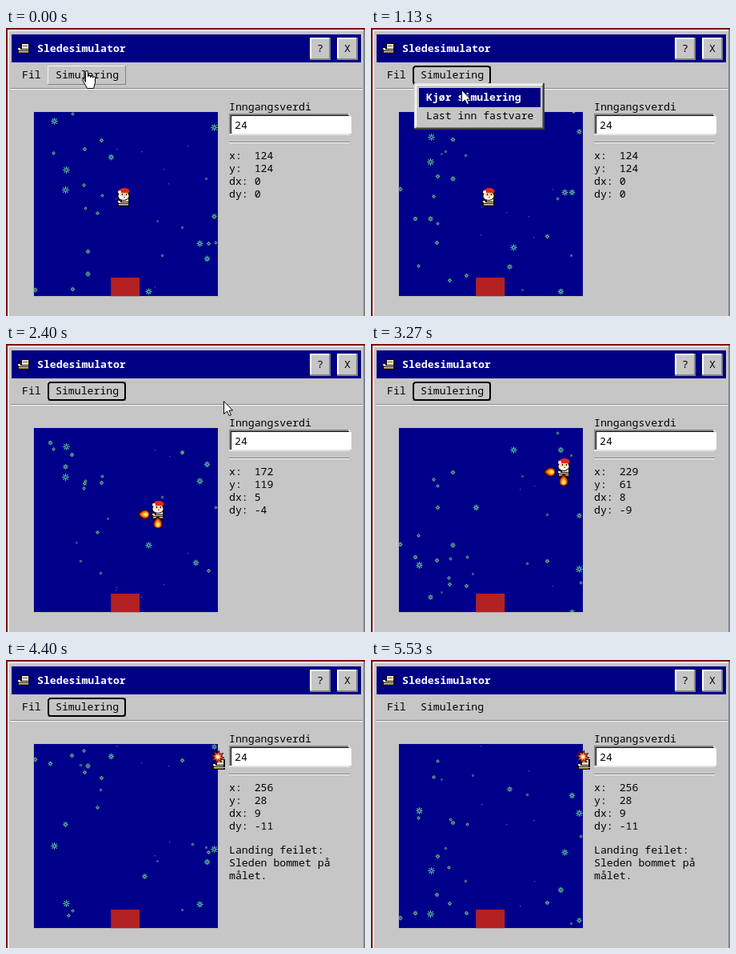
An HTML page with a canvas for the animation above (5.59 s loop, 449 by 360 pixels).

```html
<!DOCTYPE html>
<html lang="no">
<head>
<meta charset="utf-8">
<title>Sledesimulator</title>
<style>
html, body { margin: 0; width: 449px; height: 360px; overflow: hidden; background: #c6c6c6; }
canvas { position: absolute; left: 0; top: 0; }
.t { position: absolute; font: 13.2px/16px "Noto Sans Mono", "DejaVu Sans Mono", monospace; color: #000; white-space: pre; }
.w { color: #fff; font-weight: 700; }
</style>
</head>
<body>
<canvas id="scene" width="449" height="360"></canvas>
<div id="text"></div>
<canvas id="pointer" width="449" height="360"></canvas>
<script>
const W = 449, H = 360, LOOP = 5590, FPS = 15, STEPS = 84;
const g = document.getElementById('scene').getContext('2d');
const p = document.getElementById('pointer').getContext('2d');
const sky = { x: 34.7, y: 105, size: 230.3 };
const GREY = '#c6c6c6', SHADE = '#848484', LIGHT = '#e4e4e4', NAVY = '#000084';
const CREAM = '#eadfce', INK = '#111';

function label(x, y, str, cls = '') {
  const el = document.createElement('div');
  el.className = 't ' + cls;
  el.style.left = x + 'px';
  el.style.top = y + 'px';
  el.textContent = str;
  document.getElementById('text').append(el);
  return el;
}

label(39, 17, 'Sledesimulator', 'w');
label(389, 17, '?');
label(423, 17, 'X');
label(20, 50, 'Fil');
label(62, 50, 'Simulering');
label(279, 90, 'Inngangsverdi');
label(286, 113, '24');
const stats = label(279, 151, '');
const verdict = label(279, 229, 'Landing feilet:\nSleden bommet på\nmålet.');
const runItem = label(69, 78, 'Kjør simulering');
const loadItem = label(69, 101, 'Last inn fastvare');

function rect(c, x, y, w, h) {
  g.fillStyle = c;
  g.fillRect(x, y, w, h);
}

// Bevel: top and left in one colour, bottom and right in the other.
function bevel(x, y, w, h, a, b, n = 1) {
  rect(b, x, y, w, h);
  rect(a, x, y, w - n, h - n);
  rect(GREY, x + n, y + n, w - 2 * n, h - 2 * n);
}

function rule(x, y, w) {
  rect(SHADE, x, y, w, 1);
  rect('#fff', x, y + 1, w, 1);
}

function frameWindow() {
  rect('#800000', 0, 0, W, H);
  bevel(2, 2, W - 2, H + 8, '#fff', SHADE, 2);
  rect(NAVY, 7, 8, 437, 35);
  sled(14, 19);
  for (const x of [380, 414]) bevel(x, 12, 26, 28, '#fff', SHADE, 2);
  rule(6, 75, 440);
  bevel(279, 107, 151, 27, SHADE, LIGHT, 2);
  rect(INK, 281, 109, 148, 1);
  rect(INK, 281, 109, 1, 23);
  rect('#fff', 282, 110, 150, 22);
  rule(279, 142, 151);
}

function menuButton(active) {
  bevel(52, 47, 98, 24, '#f2f2f2', SHADE);
  if (!active) return;
  g.strokeStyle = '#000';
  g.lineWidth = 2;
  g.beginPath();
  g.roundRect(53, 48, 96, 22, 3);
  g.stroke();
}

function menu(lit) {
  bevel(54, 69, 163, 58, LIGHT, '#404040', 2);
  bevel(56, 71, 159, 54, '#fff', SHADE);
  if (lit) rect(NAVY, 60, 75, 152, 24);
}

// --- Snow: nearer flakes fall faster and are larger.
const PERIOD = 324, SNOW_TOP = 62;
let seed = 24;
function random(a, b) {
  seed = (seed * 16807) % 2147483647;
  return a + (b - a) * seed / 2147483647;
}

const near = [
  [74, 202, 17], [75, 177, 16.65], [60, 116, 16.48], [260, 124, 16.42],
  [178, 329, 15.82], [242, 269, 15.27], [251, 288, 14.18], [131, 161, 14.1],
  [237, 89, 14.1], [260, 235, 12.8], [173, 83, 12.65], [74, 25, 12.55],
  [102, 307, 12.08], [36, 327, 11.65], [102, 279, 10.8]
];
const flakes = near.map(([x, y, v]) => ({ x, y, v }));
for (let i = 0; i < 32; i++)
  flakes.push({ x: random(55, 265), y: random(0, PERIOD), v: 11 - 0.27 * i });

function drawFlake({ x, y, v }, k) {
  const cx = Math.round(x) + 0.5;
  const cy = Math.round(SNOW_TOP + (y + v * k - SNOW_TOP + PERIOD) % PERIOD) + 0.5;
  const r = 0.26 * v;
  g.globalAlpha = Math.min(1, 0.45 + v / 22);
  if (r < 1.2) {
    rect('#6aa37c', cx - 0.5, cy - 0.5, 1.3, 1.3);
  } else {
    g.strokeStyle = v > 13 ? '#5fcb94' : '#68b47c';
    g.lineWidth = 1.1;
    g.beginPath();
    for (let i = 0; i < 8; i++) {
      const c = Math.cos(i * Math.PI / 4), s = Math.sin(i * Math.PI / 4);
      g.moveTo(cx + c * r * 0.25, cy + s * r * 0.25);
      g.lineTo(cx + c * r, cy + s * r);
    }
    g.stroke();
  }
  g.globalAlpha = 1;
}

function drawSky(k) {
  g.save();
  g.beginPath();
  g.rect(sky.x, sky.y, sky.size, sky.size);
  g.clip();
  rect('#00008b', sky.x, sky.y, sky.size, sky.size);
  for (const f of flakes) drawFlake(f, k);
  rect('#b22222', 131.2, 312, 36, 24);
  g.restore();
}

// --- Flight under constant thrust, in ticks of 100 ms.
const START = 12, CRASH = 35;

function flight(tick) {
  if (tick <= START) return { x: 124, y: 124, dx: 0, dy: 0 };
  const m = Math.min(tick, CRASH) - 16;
  return {
    x: Math.round(136 + 3.19 * m + 0.164 * m * m),
    y: Math.round(134 + 0.81 * m - 0.336 * m * m),
    dx: Math.trunc(2.95 + 0.328 * m),
    dy: Math.trunc(0.81 - 0.672 * m)
  };
}

function sled(x, y) {
  rect(INK, x + 4, y, 12, 10);
  rect(CREAM, x + 6, y + 1, 8, 6);
  rect('#8a6238', x + 7, y + 3, 6, 1);
  rect(INK, x, y + 5, 6, 6);
  rect(CREAM, x + 1, y + 6, 3, 2);
  rect(CREAM, x + 2, y + 8, 12, 1);
  rect(CREAM, x + 2, y + 10, 12, 1);
  rect(INK, x, y + 11, 16, 2);
  rect('#8a6238', x + 2, y + 11, 12, 1);
}

function blob(c, x, y, rx, ry) {
  g.fillStyle = c;
  g.beginPath();
  g.ellipse(x, y, rx, ry, 0, 0, 2 * Math.PI);
  g.fill();
}

function rider(cx, top) {
  sled(cx - 8, top + 10);
  blob(INK, cx, top + 8, 8, 8);
  blob('#fff4e4', cx, top + 10, 6.5, 5);
  blob('#e02a1c', cx + 1, top + 4, 6.5, 4);
  blob('#fff', cx - 5, top + 5, 2, 2);
  rect('#f5cb98', cx - 4, top + 6, 9, 4);
  for (const dx of [-2, 3]) rect(INK, cx + dx, top + 7, 1, 2);
  rect('#c0392b', cx, top + 11, 2, 1);
}

function drop(w, h, y, c) {
  g.beginPath();
  g.moveTo(0, y - h);
  g.bezierCurveTo(w, y - h * 0.4, w, y, w, y + h * 0.25);
  g.bezierCurveTo(w, y + h * 1.2, -w, y + h * 1.2, -w, y + h * 0.25);
  g.bezierCurveTo(-w, y, -w, y - h * 0.4, 0, y - h);
  g.fillStyle = c;
  g.fill();
}

function flame(x, y, turn) {
  g.save();
  g.translate(x, y);
  g.rotate(turn);
  ['#2a0c04', '#e2451a', '#ff9a1f', '#ffe45a'].forEach((c, i) => drop(6 - 1.3 * i, 8 - 1.7 * i, i * 0.8, c));
  g.restore();
}

function burst(x, y) {
  ['#4a0c06', '#d8361a', '#ff9a4a', '#fff0d8'].forEach((c, i) => {
    const r = 9 - 2 * i;
    g.beginPath();
    for (let j = 0; j < 16; j++) {
      const a = (j + 0.5) * Math.PI / 8, q = j % 2 ? r * 0.55 : r;
      g.lineTo(x + q * Math.cos(a), y + q * Math.sin(a));
    }
    g.fillStyle = c;
    g.fill();
  });
}

function drawCraft(s, flying, crashed) {
  const scale = sky.size / 256;
  const cx = Math.round(sky.x + s.x * scale + 0.6);
  const top = Math.round(sky.y + s.y * scale - 16.4);
  if (crashed) {
    sled(cx - 8, top + 10);
    burst(cx - 1, top + 7);
    return;
  }
  rider(cx, top);
  if (flying) {
    flame(cx - 18, top + 17, -Math.PI / 2);
    flame(cx, top + 27, 0);
  }
}

// --- Mouse pointer
function outline() {
  p.fillStyle = '#fff';
  p.strokeStyle = '#000';
  p.lineWidth = 1;
  p.lineJoin = 'round';
  p.fill();
  p.stroke();
}

function arrow(x, y) {
  p.beginPath();
  for (const [dx, dy] of [[0, 0], [0, 16], [4, 12.5], [6.5, 18], [9, 17], [6.5, 11.5], [11, 11.5]])
    p.lineTo(x + dx + 0.5, y + dy + 0.5);
  p.closePath();
  outline();
}

function hand(x, y) {
  const l = x - 5.5, t = y + 0.5;
  p.beginPath();
  p.moveTo(l + 4, t + 14);
  p.lineTo(l + 4, t + 2);
  p.arc(l + 5.5, t + 1.5, 1.5, Math.PI, 0);
  p.lineTo(l + 7, t + 6);
  for (let i = 0; i < 3; i++) p.arc(l + 8.5 + 3 * i, t + 7.5 + 0.6 * i, 1.5, Math.PI, 0);
  p.lineTo(l + 16, t + 15);
  p.lineTo(l + 14, t + 22);
  p.lineTo(l + 6, t + 22);
  p.lineTo(l, t + 11);
  p.lineTo(l + 2, t + 10);
  p.closePath();
  outline();
}

function ease(t, a, b) {
  const u = Math.min(1, Math.max(0, (t - a) / (b - a)));
  return u * u * (3 - 2 * u);
}

function pointerAt(t) {
  const a = ease(t, 0.68, 1.02), b = ease(t, 1.24, 1.56);
  return { x: Math.round(101 + 12 * a + 159 * b), y: Math.round(53 + 24 * a - 6 * b) };
}

function draw(k) {
  const t = k / FPS, tick = Math.floor(t * 10 + 1e-6);
  const s = flight(tick), crashed = tick >= CRASH;
  const open = t > 0.35 && t < 1.23;
  const pos = pointerAt(t), lit = open && pos.y > 74;

  frameWindow();
  if (t < 5.45) menuButton(t > 0.35);
  drawSky(k);
  drawCraft(s, tick > START, crashed);
  if (open) menu(lit);

  runItem.hidden = loadItem.hidden = !open;
  runItem.className = lit ? 't w' : 't';
  verdict.hidden = !crashed;
  stats.textContent = `x:  ${s.x}\ny:  ${s.y}\ndx: ${s.dx}\ndy: ${s.dy}`;

  p.clearRect(0, 0, W, H);
  if (t < 3.13) (pos.y < 66 ? hand : arrow)(pos.x, pos.y);
}

const began = performance.now();
let last = -1;
function loop() {
  const ms = (performance.now() - began) % LOOP;
  const k = Math.min(STEPS - 1, Math.floor((ms + 5) * FPS / 1000));
  if (k !== last) draw(last = k);
  requestAnimationFrame(loop);
}
loop();
</script>
</body>
</html>
```
